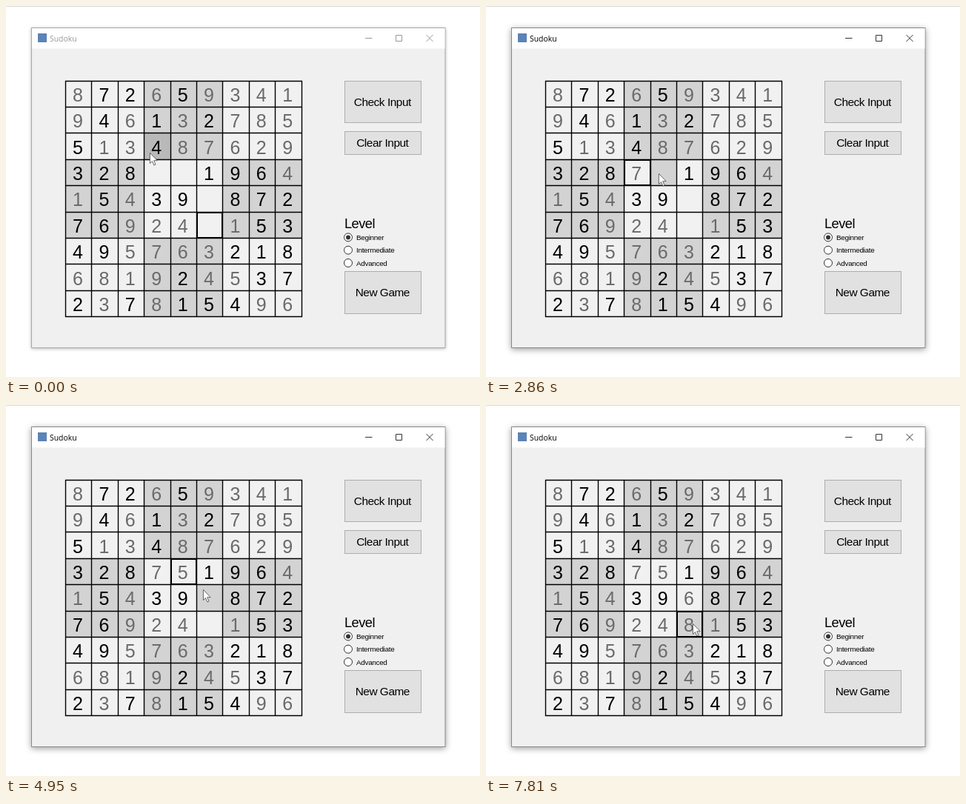
Write an HTML page that moves like this. It is 640 px wide and 501 px high and loops after 8000 ms.

```html
<!DOCTYPE html>
<html lang="en">
<head>
<meta charset="utf-8">
<title>Sudoku</title>
<style>
  html, body { margin: 0; width: 100%; height: 100%; overflow: hidden; background: #fff; }
  svg { display: block; width: 640px; height: 501px; }
  text { font-family: "Liberation Sans", Arial, sans-serif; letter-spacing: -.03em; }
  .frame { fill: #f0f0f0; stroke: #a9a9a9; filter: drop-shadow(0 1px 2px rgba(0, 0, 0, .28)); }
  .title { font: 10.4px "Open Sans", "Noto Sans", sans-serif; letter-spacing: 0; fill: #999; }
  .tools { fill: none; stroke: #999; }
  .active .frame { stroke: #8a8a8a; filter: drop-shadow(0 2px 4px rgba(0, 0, 0, .38)); }
  .active .title { fill: #000; }
  .active .tools { stroke: #333; }
  .level { font-size: 18.3px; }
  .button rect { fill: #e1e1e1; stroke: #adadad; }
  .button text { font-size: 15.4px; text-anchor: middle; }
  .radio circle { fill: #fff; stroke: #333; }
  .radio .dot { fill: #333; stroke: none; }
  .radio text { font-size: 9.9px; }
  .digit { font-size: 25px; letter-spacing: 0; text-anchor: middle; }
  .entry { fill: #6a6a6a; }
  .lines { stroke: #000; stroke-width: 1.4; }
  .focus { fill: none; stroke: #000; stroke-width: 2; }
  .cursor { fill: #fff; stroke: #444; stroke-width: .8; stroke-linejoin: round; }
</style>
</head>
<body>
<svg id="stage" viewBox="0 0 640 501">
  <rect width="640" height="1" fill="#d9d9d9"/>
  <rect class="frame" x="34.5" y="29.5" width="558.5" height="432"/>
  <rect x="35" y="30" width="557.5" height="27.5" fill="#fff"/>
  <rect x="43" y="37" width="12" height="12" fill="#5b83b5"/>
  <text class="title" x="59" y="47.7">Sudoku</text>
  <path class="tools" d="M485 43.5h9.5M526.5 39.5h8v8h-8zM567.5 39l9 9m0-9l-9 9"/>
  <g id="board"></g>
  <g id="panel"><text class="level" x="457" y="300">Level</text></g>
  <path class="cursor" id="cursor" d="M.4.4V14.5L3.5 11.6 5.8 17 8 16.1 5.7 10.7H10.2Z"/>
</svg>
<script>
const LOOP = 8000, STEP = 109, LEFT = 80.4, TOP = 101, CELL = 35.4;
const [stage, board, panel, cursor] =
  ['stage', 'board', 'panel', 'cursor'].map(id => document.getElementById(id));

const givens = ['.72.5....', '.4.1.2...', '5..4.....', '328..196.', '.5.39.872',
                '76.....53', '49....218', '....2..37', '2.7.154..'];

// Pointer strokes: curves drawn in whole steps from a start time
const strokes = [
  { at: 0, steps: 4, from: [194, 198], bend: [205, 232], to: [211, 230] },
  { at: 1220, steps: 1, from: [207, 228], bend: [207, 228], to: [207, 227] },
  { at: 2860, steps: 5, from: [233, 226], bend: [290, 230], to: [239, 226] },
  { at: 4730, steps: 6, from: [246, 232], bend: [284, 264], to: [274, 257] },
  { at: 6700, steps: 5, from: [286, 287], bend: [296, 318], to: [279, 295] }
];
const moves = [
  { click: 1660, type: 2210, row: 3, col: 3 },
  { click: 3850, type: 4180, row: 3, col: 4 },
  { click: 5290, type: 5940, row: 4, col: 5 },
  { click: 7480, type: 7810, row: 5, col: 5 }
];

function fits(grid, r, c, n) {
  const top = r - r % 3, left = c - c % 3;
  for (let i = 0; i < 9; i++) {
    if (grid[r][i] === n || grid[i][c] === n) return false;
    if (grid[top + Math.floor(i / 3)][left + i % 3] === n) return false;
  }
  return true;
}

function solve(grid, i = 0) {
  if (i === 81) return true;
  const r = Math.floor(i / 9), c = i % 9;
  if (grid[r][c] !== '.') return solve(grid, i + 1);
  for (const n of '123456789') {
    if (!fits(grid, r, c, n)) continue;
    grid[r][c] = n;
    if (solve(grid, i + 1)) return true;
  }
  grid[r][c] = '.';
  return false;
}

function add(parent, tag, attrs, text) {
  const el = document.createElementNS('http://www.w3.org/2000/svg', tag);
  for (const key in attrs) el.setAttribute(key, attrs[key]);
  if (text) el.textContent = text;
  return parent.appendChild(el);
}

const edgeX = c => Math.floor(LEFT + c * CELL);
const edgeY = r => Math.floor(TOP + r * CELL);

const answers = givens.map(row => [...row]);
solve(answers);
// The player mixes up the first two entries
[answers[3][3], answers[3][4]] = [answers[3][4], answers[3][3]];

const cells = answers.map((row, r) => row.map((n, c) => ({
  gray: (Math.floor(r / 3) + Math.floor(c / 3)) % 2 === 1,
  rect: add(board, 'rect', { x: edgeX(c), y: edgeY(r), width: CELL + .6, height: CELL + .6 }),
  digit: add(board, 'text', {
    class: givens[r][c] === '.' ? 'digit entry' : 'digit',
    x: LEFT + (c + .5) * CELL - 1.1,
    y: TOP + (r + .5) * CELL + 10
  }, n)
})));

let grid = '';
for (let i = 0; i < 10; i++) {
  grid += `M${edgeX(i) + .5} ${edgeY(0)}V${edgeY(9) + 1}M${edgeX(0)} ${edgeY(i) + .5}H${edgeX(9) + 1}`;
}
add(board, 'path', { class: 'lines', d: grid });
const focus = add(board, 'rect', { class: 'focus' });

function button(y, h, label) {
  const g = add(panel, 'g', { class: 'button' });
  add(g, 'rect', { x: 457.5, y: y + .5, width: 103, height: h });
  add(g, 'text', { x: 508.3, y: y + h / 2 + 5.8 }, label);
}
function radio(y, label, on) {
  const g = add(panel, 'g', { class: 'radio' });
  add(g, 'circle', { cx: 462, cy: y, r: 5.5 });
  if (on) add(g, 'circle', { class: 'dot', cx: 462, cy: y, r: 3 });
  add(g, 'text', { x: 473, y: y + 3.7 }, label);
}
button(101, 56, 'Check Input');
button(169, 31, 'Clear Input');
button(358, 57, 'New Game');
['Beginner', 'Intermediate', 'Advanced'].forEach((label, i) => radio(312.4 + i * 17.3, label, i === 0));

function pointer(t) {
  const s = strokes.filter(e => e.at <= t).pop();
  const u = Math.min(Math.floor((t - s.at) / STEP), s.steps) / s.steps, v = 1 - u;
  return s.from.map((p, i) => Math.round(v * v * p + 2 * u * v * s.bend[i] + u * u * s.to[i]));
}

function draw(t) {
  const [x, y] = pointer(t);
  const hoverRow = Math.floor((y - TOP) / CELL), hoverCol = Math.floor((x - LEFT) / CELL);
  cells.forEach((row, r) => row.forEach((cell, c) => {
    const over = r === hoverRow && c === hoverCol;
    const fills = cell.gray ? ['#d3d3d3', '#b9b9b9'] : ['#f1f1f1', '#d3d3d3'];
    cell.rect.setAttribute('fill', fills[+over]);
  }));
  for (const m of moves) {
    cells[m.row][m.col].digit.setAttribute('visibility', t >= m.type ? 'visible' : 'hidden');
  }
  const { row, col } = moves.filter(m => m.click <= t).pop() || moves[3];
  focus.setAttribute('x', edgeX(col) + 1);
  focus.setAttribute('y', edgeY(row) + 1);
  focus.setAttribute('width', edgeX(col + 1) - edgeX(col) - 1);
  focus.setAttribute('height', edgeY(row + 1) - edgeY(row) - 1);
  cursor.setAttribute('transform', `translate(${x} ${y})`);
  stage.classList.toggle('active', t >= moves[0].click);
}

const start = performance.now();
function tick() {
  draw((performance.now() - start) % LOOP);
  requestAnimationFrame(tick);
}
tick();
</script>
</body>
</html>
```
